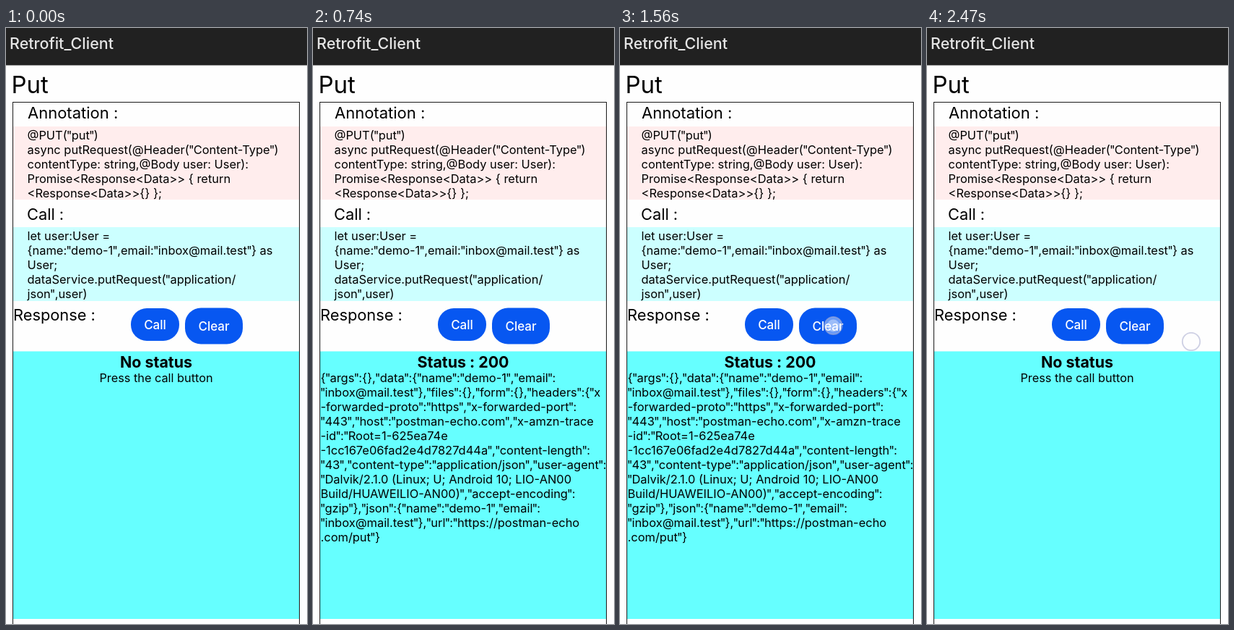
Recreate the animation shown at these times as an HTML page with a canvas. Size 417 px wide and 823 px high, loop 2570 ms.

```html
<!DOCTYPE html>
<html lang="en">
<head>
<meta charset="utf-8">
<title>Retrofit_Client</title>
<style>
html, body { margin: 0; width: 100%; height: 100%; overflow: hidden; background: #fefefe; }
canvas { display: block; width: 417px; height: 823px; }
</style>
</head>
<body>
<canvas id="stage" width="417" height="823"></canvas>
<script>
const ctx = document.getElementById("stage").getContext("2d");
const LOOP = 2570;
const FAMILY = "Inter, 'Noto Sans', sans-serif";
const CODE_SIZE = 16.45;
const LINE = 20;
const QUOTE = 0.36; // advance of a straight quote, in em

const NAME = "demo-1";
const MAIL = "inbox@mail.test";

const annotation = [
  '@PUT("put")',
  'async putRequest(@Header("Content-Type")',
  'contentType: string,@Body user: User):',
  'Promise<Response<Data>> { return',
  '<Response<Data>>{} };'
];

const call = [
  'let user:User =',
  `{name:"${NAME}",email:"${MAIL}"} as`,
  'User;',
  'dataService.putRequest("application/',
  'json",user)'
];

const response = [
  `{"args":{},"data":{"name":"${NAME}","email":`,
  `"${MAIL}"},"files":{},"form":{},"headers":{"x`,
  '-forwarded-proto":"https","x-forwarded-port":',
  '"443","host":"postman-echo.com","x-amzn-trace',
  '-id":"Root=1-625ea74e',
  '-1cc167e06fad2e4d7827d44a","content-length":',
  '"43","content-type":"application/json","user-agent":',
  '"Dalvik/2.1.0 (Linux; U; Android 10; LIO-AN00',
  'Build/HUAWEILIO-AN00)","accept-encoding":',
  `"gzip"},"json":{"name":"${NAME}","email":`,
  `"${MAIL}"},"url":"https://postman-echo`,
  '.com/put"}'
];

// Touch marks: [start, end, x, y, opacity]
const touches = [
  [1440, 1560, 295.5, 411, 0.25],
  [1560, 1680, 295.5, 411, 1],
  [1680, 1830, 295.5, 411, 0.55],
  [1830, 1950, 295.5, 411, 0.2],
  [2350, 2470, 366, 433, 0.5],
  [2470, 2570, 366, 433, 1]
];

function rect(x, y, w, h, color) {
  ctx.fillStyle = color;
  ctx.fillRect(x, y, w, h);
}

function disc(x, y, r, color) {
  ctx.beginPath();
  ctx.arc(x, y, r, 0, Math.PI * 2);
  ctx.fillStyle = color;
  ctx.fill();
}

function text(str, x, y, size, { color = "#000", weight = 400, align = "left" } = {}) {
  ctx.font = `${weight} ${size}px ${FAMILY}`;
  ctx.fillStyle = color;
  ctx.textAlign = align;
  ctx.fillText(str, x, y);
}

function codeLine(str, x, y) {
  for (const part of str.split(/(")/)) {
    if (!part) continue;
    const width = ctx.measureText(part).width;
    const step = part === '"' ? QUOTE * CODE_SIZE : width;
    ctx.fillText(part, x + (step - width) / 2, y);
    x += step;
  }
}

function code(lines, x, y) {
  ctx.font = `400 ${CODE_SIZE}px ${FAMILY}`;
  ctx.fillStyle = "#000";
  ctx.textAlign = "left";
  lines.forEach((line, i) => codeLine(line, x, y + i * LINE));
}

function button(label, x, y, w, h) {
  ctx.fillStyle = "#0757f1";
  ctx.beginPath();
  ctx.roundRect(x, y, w, h, 22);
  ctx.fill();
  text(label, x + w / 2, y + h / 2 + 6.5, 17, { color: "#fff", weight: 500, align: "center" });
}

function touch(x, y, opacity) {
  ctx.globalAlpha = opacity;
  disc(x, y, 8.5, "rgba(255,255,255,0.35)");
  disc(x, y, 12.2, "rgba(255,255,255,0.4)");
  ctx.lineWidth = 1.8;
  ctx.strokeStyle = "rgba(165,170,205,0.55)";
  ctx.stroke();
  ctx.globalAlpha = 1;
}

function page() {
  rect(0, 0, 417, 823, "#fefefe");
  rect(0, 0, 417, 51.5, "#212121");
  text("Retrofit_Client", 5, 29, 21.5, { color: "#e6e6e6", weight: 500 });
  text("Put", 7.5, 90, 33);

  rect(10, 136, 396, 101, "#ffeded");
  rect(10, 275, 396, 102, "#ccffff");
  rect(10, 446.5, 396, 369.5, "#66ffff");
  ctx.strokeStyle = "#1a1a1a";
  ctx.lineWidth = 1;
  ctx.strokeRect(9.5, 102.5, 397, 760);

  text("Annotation :", 30, 125, 22);
  code(annotation, 29.5, 153.5);
  text("Call :", 29, 265, 21.8);
  code(call, 29.5, 293);
  text("Response :", 10, 404, 21.8);

  button("Call", 173, 387, 67, 45);
  button("Clear", 248, 386.5, 80, 50);
}

function draw(t) {
  page();
  const loaded = t >= 310 && t < 1680;
  text(loaded ? "Status : 200" : "No status", 208, 469, 21.4, { weight: 700, align: "center" });
  if (loaded) code(response, 10.5, 488.5);
  else text("Press the call button", 208, 489, 16.3, { align: "center" });

  for (const [start, end, x, y, opacity] of touches) {
    if (t >= start && t < end) touch(x, y, opacity);
  }
}

const began = performance.now();
function tick() {
  draw((performance.now() - began) % LOOP);
  requestAnimationFrame(tick);
}
tick();
</script>
</body>
</html>
```
